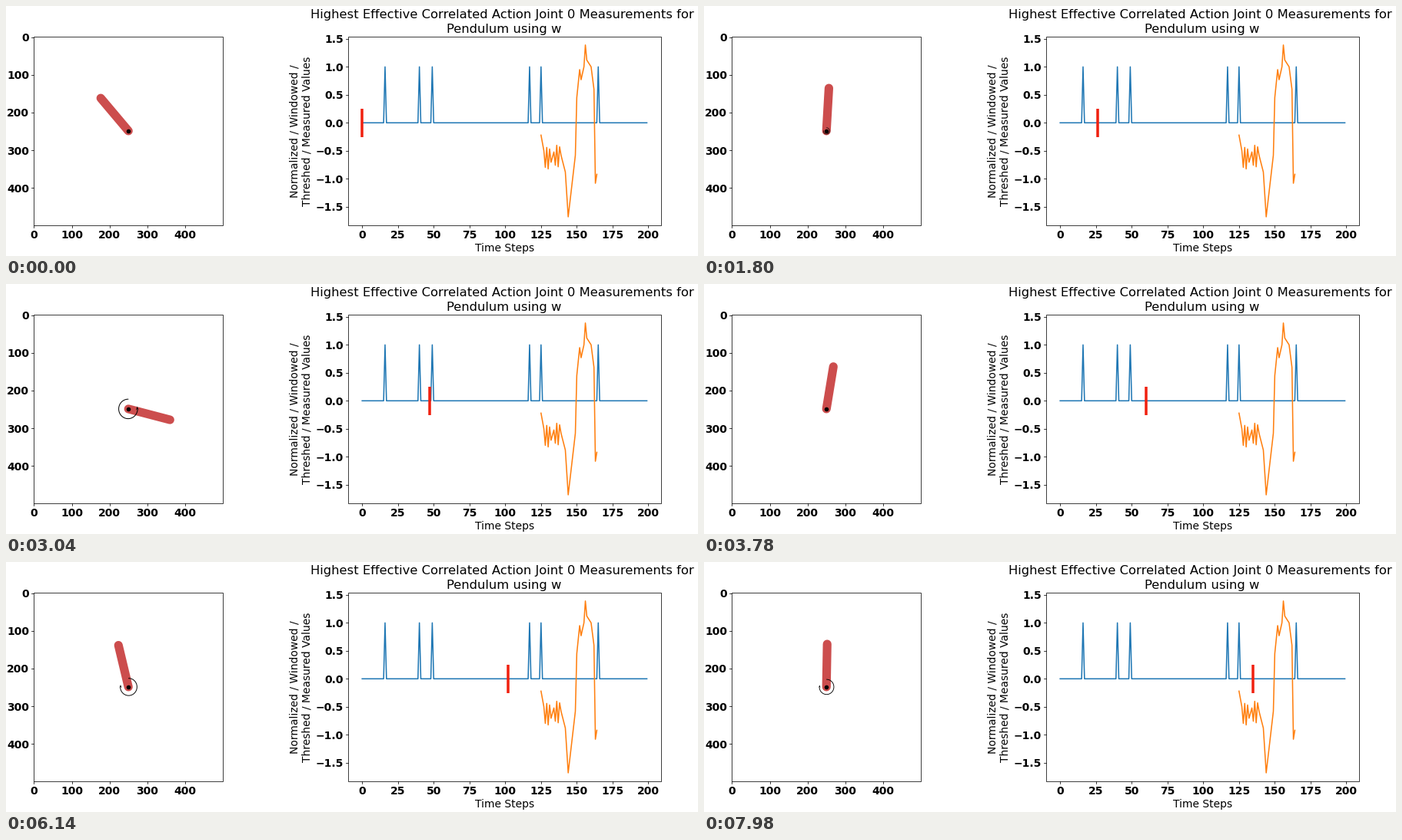
Animation, 900 px wide and 326 px high, one loop 8000 ms. Source, as a matplotlib script:

```python
import numpy as np
import matplotlib.pyplot as plt
from matplotlib.animation import FuncAnimation
from matplotlib.patches import Polygon, Rectangle

W, H = 900, 326
FRAMES, DT = 400, 20
TOP, BOTTOM = 40.3, 286.2
PIVOT = np.array([159.2, 162.9])
ROD = 55.9
LABEL, TITLE = 13.85, 16.33
BLUE, ORANGE, RED = "#1f77b4", "#ff7f0e", "#f0200f"

plt.rcParams["font.family"] = "DejaVu Sans"
fig = plt.figure(figsize=(W / 72, H / 72), dpi=72, facecolor="white")
ax = fig.add_axes([0, 0, 1, 1])
ax.set_xlim(0, W)
ax.set_ylim(H, 0)
ax.axis("off")


def px(v):
    return 463.2 + 1.861 * np.asarray(v)


def py(v):
    return 152.3 - 73.0 * np.asarray(v)


def panel(left, right, xticks, yticks):
    """Frame with bold tick labels; ticks are (position, label) pairs."""
    ax.add_patch(Rectangle((left, TOP), right - left, BOTTOM - TOP,
                           fill=False, ec="black", lw=0.75, zorder=6))
    for x, s in xticks:
        ax.plot([x, x], [BOTTOM, BOTTOM + 3], color="black", lw=0.75)
        ax.text(x, BOTTOM + 5.8, s, size=LABEL, weight="bold",
                ha="center", va="top")
    for y, s in yticks:
        ax.plot([left - 3, left], [y, y], color="black", lw=0.75)
        ax.text(left - 6, y, s, size=LABEL, weight="bold",
                ha="right", va="center_baseline")


def line_text(x, y, s, size, rotation=0):
    ax.text(x, y, s, size=size, ha="center", va="baseline",
            rotation=rotation, rotation_mode="anchor")


hundreds = range(0, 500, 100)
panel(36.2, 282.2,
      [(36.3 + 0.492 * v, str(v)) for v in hundreds],
      [(TOP + 0.2 + 0.492 * v, str(v)) for v in hundreds])
panel(445, 852.2,
      [(px(v), str(v)) for v in range(0, 201, 25)],
      [(py(v), f"{v:.1f}".replace("-", "\u2212"))
       for v in np.arange(-1.5, 1.6, 0.5)])

line_text(645.2, 15.6, "Highest Effective Correlated Action Joint 0 "
          "Measurements for", TITLE)
line_text(647.2, 34.8, "Pendulum using w", TITLE)
line_text(648.5, 320, "Time Steps", LABEL)
line_text(379.5, 163, "Normalized / Windowed /", LABEL, 90)
line_text(395.8, 163, "Threshed / Measured Values", LABEL, 90)

# Thresholded pulses
pulses = np.zeros(200)
pulses[[16, 40, 49, 117, 125, 165]] = 1
ax.plot(px(np.arange(200)), py(pulses), color=BLUE, lw=1.55)

# Measured window: a few turning points plus an early beating zigzag
TURNS = [(125, -.22), (128, -.64), (139, -.58), (142, -.88), (144, -1.68),
         (149, -.58), (150, .45), (152, .95), (153, .77), (155, 1.0),
         (156, 1.39), (157, 1.12), (160, 1.0), (162, .6), (163, -1.08),
         (164, -.92)]
n = np.arange(125, 165)
zigzag = 0.2 * (-1.0) ** n * np.cos(np.pi * (n - 136.5) / 7)
measured = np.interp(n, *zip(*TURNS)) + zigzag * ((n >= 128) & (n < 139))
ax.plot(px(n), py(measured), color=ORANGE, lw=1.55)

# Full turns of the rod: (step at the lowest point, rate)
TURNOVERS = [(9.57, 0.1813), (43.28, 0.1917), (113.35, 0.25)]

# Key torques as (step, value)
TORQUE = [(0, 0), (15, 0), (24, -.8), (37, 2), (60, 0), (80, 0),
          (102, -1), (135, -.87)]


def step_at(t):
    """Step counter after t seconds: steady pace after a slow start."""
    return int(round(17.7 * t - 6.5 * (1 - np.exp(-t / 0.77))))


def angle_at(step):
    """Counterclockwise angle from upright; each turn is a free fall from
    the top, round the bottom and back up."""
    return sum(4 * np.arctan(np.exp(k * (step - c))) for c, k in TURNOVERS)


rod, = ax.plot([], [], color="#cc4d4d", lw=11.2, solid_capstyle="round")
ax.plot(*PIVOT, "o", color="black", ms=5.6, mew=0)
arc, = ax.plot([], [], color="black", solid_capstyle="butt")
head = ax.add_patch(Polygon(np.zeros((4, 2)), fc="black", lw=0, zorder=4))
cursor, = ax.plot([], [], color=RED, lw=3.5, solid_capstyle="butt", zorder=5)

SWEEP = np.radians(np.linspace(88, 356, 60))
ARC = np.column_stack([22.3 * np.cos(SWEEP), -22.5 * np.sin(SWEEP)])
ARC[:, 0] -= 0.6 * (1 + np.cos(SWEEP))
HEAD = np.array([(20.4, -5.8), (23.4, 2), (20.8, 0.6), (17.6, 2)])


def update(i):
    step = step_at(i * DT / 1000)
    th = angle_at(step)
    tip = PIVOT - ROD * np.array([np.sin(th), np.cos(th)])
    rod.set_data(*zip(PIVOT, tip))

    u = np.interp(step, *zip(*TORQUE))
    size = abs(u) / 2
    flip = size * np.array([1 if u > 0 else -1, 1])
    arc.set_data(*(PIVOT + ARC * flip).T)
    arc.set_linewidth(0.5 + 0.9 * size)
    head.set_xy(PIVOT + HEAD * flip)
    for part in (arc, head):
        part.set_visible(size > 0.08)

    cursor.set_data([px(step)] * 2, py([-0.25, 0.25]))
    return rod, arc, head, cursor


anim = FuncAnimation(fig, update, frames=FRAMES, interval=DT,
                     repeat=True, repeat_delay=0, blit=False)
plt.show()
```
